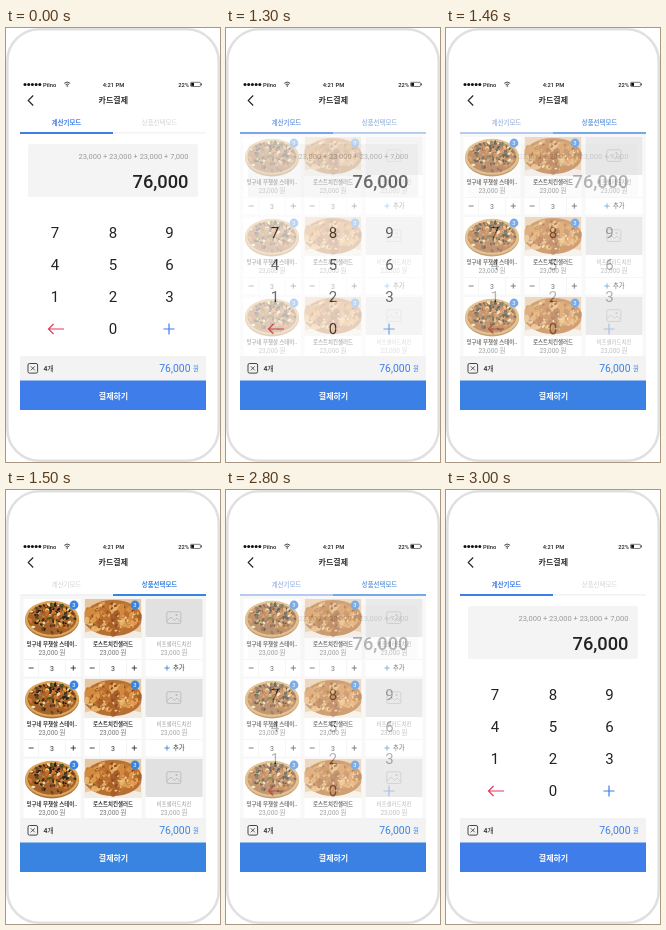
An HTML page that plays this animation: 214 px wide and 434 px high, repeating every 3100 ms.

```html
<!DOCTYPE html>
<html lang="ko">
<head>
<meta charset="utf-8">
<style>
html, body { margin: 0; height: 100%; overflow: hidden; background: #fff; }
svg { display: block; font-family: Roboto, 'Noto Sans CJK KR', 'Noto Sans CJK', sans-serif; }
</style>
</head>
<body>
<svg id="stage" width="214" height="434" viewBox="0 0 214 434"></svg>
<script>
const text = (s, x, y, size, fill, anchor = 'middle', weight = 400) =>
  `<text x="${x}" y="${y + size * 0.365}" font-size="${size}" fill="${fill}" text-anchor="${anchor}" font-weight="${weight}">${s}</text>`;
const rect = (x, y, w, h, fill, extra = '') =>
  `<rect x="${x}" y="${y}" width="${w}" height="${h}" fill="${fill}" ${extra}/>`;
const line = (d, stroke, width = 1) =>
  `<path d="${d}" fill="none" stroke="${stroke}" stroke-width="${width}"/>`;
const oval = (x, y, rx, ry, fill, turn = 0) =>
  `<ellipse cx="${x}" cy="${y}" rx="${rx}" ry="${ry}" fill="${fill}" transform="rotate(${turn} ${x} ${y})"/>`;
const plus = (x, y, r, color, width) =>
  line(`M${x - r} ${y}h${2 * r}M${x} ${y - r}v${2 * r}`, color, width);

let seed = 7;
const rnd = () => (seed = seed * 16807 % 2147483647) / 2147483647;

// Random ovals spread over an elliptical area
function scatter(n, cx, cy, rx, ry, size, colors) {
  let out = '';
  for (let i = 0; i < n; i++) {
    const a = rnd() * 6.283, d = Math.sqrt(rnd()), s = size * (0.6 + rnd() * 0.6);
    out += oval((cx + Math.cos(a) * d * rx).toFixed(1), (cy + Math.sin(a) * d * ry).toFixed(1),
      s, s * 0.6, colors[i % colors.length], Math.round(rnd() * 180));
  }
  return out;
}

function pizza() {
  return oval(46, 130, 27, 18.5, '#a8713a') + oval(46, 128.8, 27, 18, '#d9a85c') +
    oval(46, 128.8, 24.5, 15.8, '#a5622a') +
    scatter(150, 46, 128.8, 24, 15, 1.9,
      ['#2e261b', '#e0a23c', '#4f4a22', '#d4702a', '#f0dcae', '#241d16', '#c98a3a', '#7b3f1c']);
}

function chicken() {
  return `<clipPath id="dish">${rect(78.5, 109, 57, 39)}</clipPath><g clip-path="url(#dish)">` +
    rect(78.5, 109, 57, 39, '#e6c7a2') + oval(107, 148, 36, 9, '#f3ece4') +
    oval(107, 128, 29, 18, '#b87032') +
    scatter(45, 107, 127, 27, 15, 5, ['#dc9a4c', '#c17a34', '#e6b16c', '#a8602a', '#d18a3e']) +
    scatter(75, 107, 127, 27, 15, 1.7, ['#f0cc94', '#8f4c1e', '#e0a45a', '#bd6f2c']) + '</g>';
}

function shell() {
  let dots = '';
  for (let i = 0; i < 5; i++) dots += oval(19 + i * 3.7, 56.5, 1.5, 1.5, '#111');
  return rect(0, 0, 214, 434, '#fff') +
    rect(1.3, 1.3, 211.4, 431.4, '#fff', 'rx="32" stroke="#e0e0e0" stroke-width="2.6"') +
    dots + text('Pilno', 37, 56.5, 5.8, '#222', 'start', 500) +
    line('M58.3 55.3q2.9-2.6 5.8 0M59.6 56.7q1.6-1.4 3.2 0', '#111', 0.8) + oval(61.2, 58, 0.7, 0.7, '#111') +
    text('4:21 PM', 107.5, 56.5, 5.8, '#222', 'middle', 500) +
    text('22%', 183, 56.5, 5.8, '#222', 'end', 500) +
    rect(184.6, 54.3, 9.8, 4.2, 'none', 'rx=".8" stroke="#222" stroke-width=".6"') +
    rect(185.2, 54.9, 2.8, 3, '#111') + rect(195, 55.5, 0.8, 1.8, '#222') +
    line('M27.2 67.5l-5 5 5 5', '#222', 1.1) +
    text('카드결제', 107.3, 72.3, 8, '#333', 'middle', 700);
}

// Tabs, total bar and button shared by both modes
function chrome(blue, active) {
  const tab = (s, x, on) => text(s, x, 95, 6.4, on ? blue : '#d2d2d2', 'middle', on ? 700 : 400);
  return tab('계산기모드', 60.5, active == 0) + tab('상품선택모드', 153.5, active == 1) +
    rect(14, 104.5, 186, 0.8, '#e8e8e8') + rect(14 + active * 93, 104, 93, 2, blue) +
    rect(14, 328, 186, 25, '#f3f3f3') +
    rect(22, 335.5, 9.6, 9.6, 'none', 'rx="1.5" stroke="#333" stroke-width=".9"') +
    line('M24.8 338.3l4 4m0-4l-4 4', '#333', 0.8) +
    text('4개', 37.5, 340.5, 6.8, '#222', 'start', 500) +
    text('76,000', 184.5, 340.1, 10.4, blue, 'end') + text('원', 193, 340.2, 6.4, blue, 'end') +
    rect(14, 352.5, 186, 29.5, blue) + text('결제하기', 107.5, 367.8, 8, '#fff', 'middle', 700);
}

function calculator() {
  const blue = '#3f7dea', cols = [49, 107, 163.5];
  let keys = text(0, 107, 301, 15, '#222');
  for (let i = 0; i < 9; i++)
    keys += text(7 - 3 * Math.floor(i / 3) + i % 3, cols[i % 3], 204.5 + 32.2 * Math.floor(i / 3), 15, '#222');
  return rect(22, 116, 170, 53, '#f4f4f4', 'rx="2.5"') +
    text('23,000 + 23,000 + 23,000 + 7,000', 182.5, 127.8, 7.5, '#999', 'end') +
    text('76,000', 182.5, 152.9, 18.3, '#222', 'end', 500) + keys +
    line('M58 301H42.5m5-5l-5 5 5 5', '#e5395c', 1.2) + plus(163, 301, 5.5, blue, 1.2) +
    chrome(blue, 0);
}

function products() {
  const blue = '#3884e0', names = ['밍구네 부챗살 스테이..', '로스트치킨샐러드', '비프샐러드치킨'];
  let row = '';
  names.forEach((name, i) => {
    const x = 46 + 61 * i, off = i == 2;
    row += rect(x - 28.5, 109, 57, 77.5, '#fff') +
      [pizza, chicken, () => rect(139.5, 109, 57, 38, '#e1e1e1')][i]() +
      text(name, x, 154, 5.45, off ? '#999' : '#333', 'middle', off ? 400 : 700) +
      text('23,000 원', x, 163, 6.5, off ? '#a5a5a5' : '#777') +
      line(`M${x - 28.5} 169.5h57`, '#eee', 0.7);
    if (off) {
      row += rect(160.8, 121.8, 14, 11.6, 'none', 'rx="1" stroke="#b5b5b5" stroke-width=".8"') +
        line('M161 131l4-4 3.5 3.5 2.5-2.5 3.5 3.5', '#b5b5b5', 0.8) + oval(170.5, 125, 1.1, 1.1, '#b5b5b5') +
        plus(161, 178, 2.6, blue, 0.9) + text('추가', 167, 178, 6.3, '#333', 'start');
    } else {
      row += oval(x + 22, 115, 4.4, 4.4, blue) + text(3, x + 22, 115, 5.8, '#fff') +
        line(`M${x - 13.5} 170v16m27-16v16`, '#eee', 0.7) +
        line(`M${x - 23.3} 178h5`, '#333', 0.9) + text(3, x, 178, 7, '#333') + plus(x + 21.3, 178, 2.6, '#333', 0.9);
    }
  });
  return rect(14, 82, 186, 24, '#fff') + rect(14, 105, 186, 224, '#f6f6f6') +
    `<g id="row">${row}</g><use href="#row" y="80"/><use href="#row" y="160"/>` + chrome(blue, 1);
}

const stage = document.getElementById('stage');
stage.innerHTML = shell() + calculator() + `<g id="top">${products()}</g>`;
const topLayer = document.getElementById('top');

// The product layer fades in and out in thirds, one step per 100 ms
function draw(now) {
  const step = Math.floor(now % 3100 / 100);
  topLayer.setAttribute('opacity', Math.max(0, Math.min(step - 12, 30 - step, 3)) / 3);
  requestAnimationFrame(draw);
}
draw(0);
</script>
</body>
</html>
```
